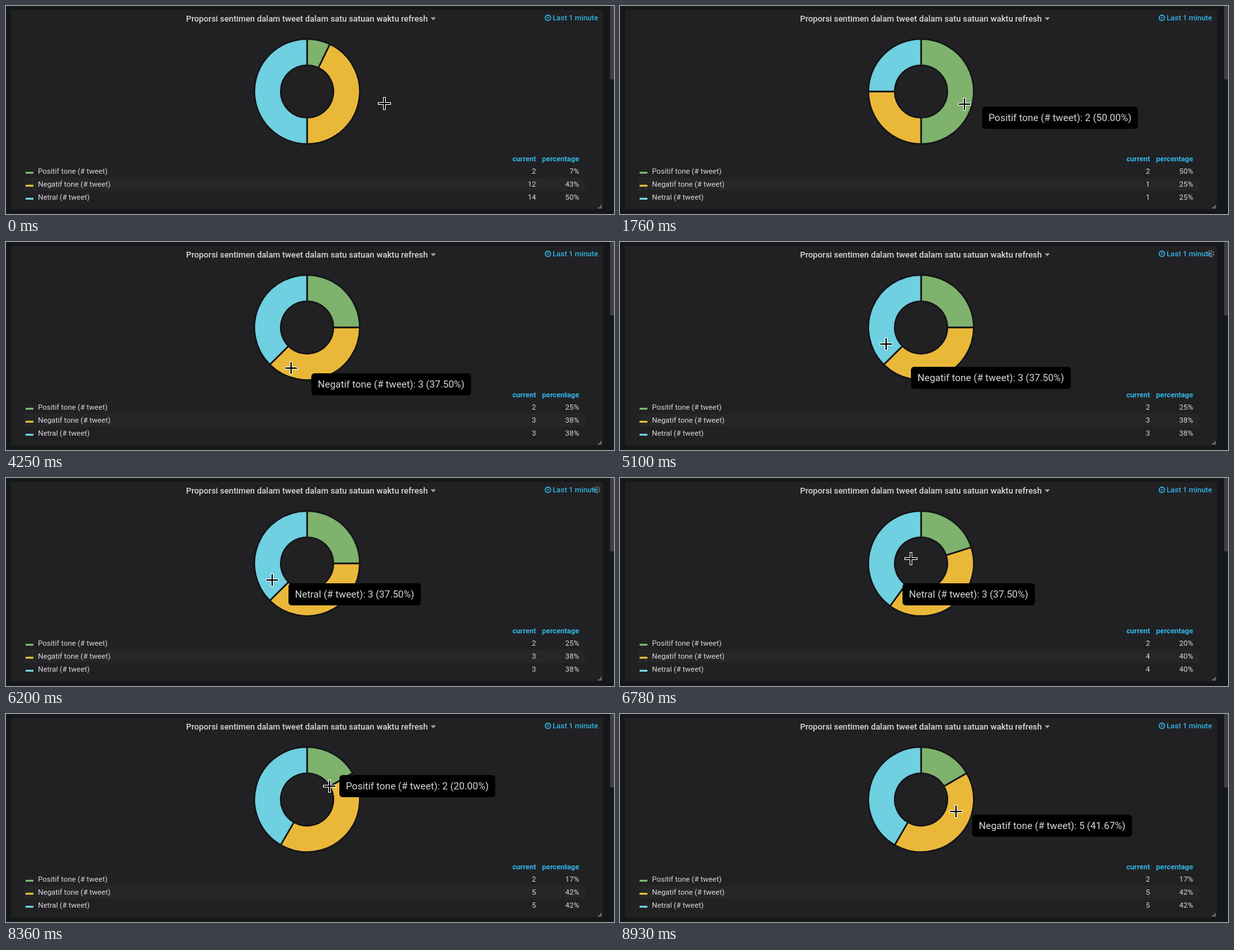
An HTML page that plays this animation: 932x320 px, repeating every 9720 ms.

```html
<!DOCTYPE html>
<html lang="id">
<head>
<meta charset="utf-8">
<title>Proporsi sentimen</title>
<style>
  html, body { margin: 0; width: 100%; height: 100%; overflow: hidden; background: #161719; }
  body { position: relative; font-family: Roboto, sans-serif; }
  svg { position: absolute; left: 0; top: 0; display: block; }
  text { fill: #d8d9da; font-size: 11.4px; }
  .title { font-size: 12.85px; font-weight: 500; }
  .accent { fill: #33b5e5; font-weight: 500; }
  .head { font-size: 11.2px; font-weight: 700; }
  .end { text-anchor: end; }
  #tip {
    position: absolute; height: 34px; padding: 0 10px; border-radius: 5px;
    background: #000; color: #d8d9da; font-size: 15px; line-height: 34px; white-space: nowrap;
  }
</style>
</head>
<body>
<svg width="932" height="320" viewBox="0 0 932 320">
  <rect x="8" y="6" width="907" height="307" fill="#212124"/>
  <rect x="926" y="-6" width="8" height="119" rx="2" fill="#404043"/>
  <text class="title" x="276" y="24">Proporsi sentimen dalam tweet dalam satu satuan waktu refresh</text>
  <path d="M651 17.5h8l-4 4.5z" fill="#a5a5a3"/>
  <g fill="none" stroke="#33b5e5">
    <circle cx="830.7" cy="18.2" r="4.1" stroke-width="1.6"/>
    <path d="M831 15.8v2.9h-2.2" stroke-width="1.1"/>
  </g>
  <text class="accent end" x="907.5" y="22">Last 1 minute</text>
  <path d="M912 306.5v4h-4.5" fill="none" stroke="#77777a" stroke-width="2"/>
  <g id="pie" stroke="#141416" stroke-width="2.4" stroke-linejoin="round"></g>
  <text class="accent head end" x="812.5" y="239">current</text>
  <text class="accent head end" x="878.5" y="239">percentage</text>
  <rect x="28" y="264" width="860" height="20" fill="#262628"/>
  <g id="legend"></g>
  <g id="spinner" fill="#8a8a8c"></g>
</svg>
<div id="tip"></div>
<svg width="932" height="320" viewBox="0 0 932 320">
  <g id="cursor">
    <path d="M0-10V10M-10 0H10" stroke="#fff" stroke-width="4"/>
    <path d="M0-9V9M-9 0H9" stroke="#000" stroke-width="2"/>
  </g>
</svg>
<script>
const LOOP = 9720;
const PIE = { x: 461.5, y: 131.5, r: 80.8, hole: 40.4 };
const TONES = [
  { name: 'Positif tone (# tweet)', color: '#7eb26d' },
  { name: 'Negatif tone (# tweet)', color: '#eab839' },
  { name: 'Netral (# tweet)', color: '#6ed0e0' }
];

const REFRESHES = [
  { at: 0, counts: [2, 12, 14], quiet: true },
  { at: 520, counts: [2, 1, 1] },
  { at: 2510, counts: [2, 3, 3] },
  { at: 5140, counts: [2, 3, 3] },
  { at: 6280, counts: [2, 4, 4] },
  { at: 8160, counts: [2, 5, 5], quiet: true }
];

// The pointer reaches x, y at `at` after moving for `move`; the tooltip follows `lag` later.
const STOPS = [
  { x: 580, y: 150, at: 0, move: 0 },
  { x: 530, y: 150, at: 560, move: 200, lag: 650 },
  { x: 443, y: 205, at: 2160, move: 440, lag: 270 },
  { x: 443, y: 197, at: 2730, move: 340, lag: 510 },
  { x: 421, y: 187, at: 4560, move: 480, lag: 220 },
  { x: 408, y: 157, at: 5020, move: 460, lag: 120 },
  { x: 486, y: 89, at: 7180, move: 780, lag: 100 },
  { x: 515, y: 150, at: 8650, move: 490, lag: 280 }
];

const $ = id => document.getElementById(id);
const sum = list => list.reduce((a, b) => a + b, 0);
const ease = k => (1 - Math.cos(Math.PI * k)) / 2;
const countsAt = t => REFRESHES.findLast(r => r.at <= t).counts;

function polar(r, turn) {
  const a = turn * 2 * Math.PI;
  return `${PIE.x + r * Math.sin(a)} ${PIE.y - r * Math.cos(a)}`;
}

function slice(from, to, color) {
  const { r, hole } = PIE, big = to - from > 0.5 ? 1 : 0;
  return `<path fill="${color}" d="M${polar(r, from)}A${r} ${r} 0 ${big} 1 ${polar(r, to)}` +
    `L${polar(hole, to)}A${hole} ${hole} 0 ${big} 0 ${polar(hole, from)}Z"/>`;
}

function drawData(counts) {
  const total = sum(counts);
  let pie = '', legend = '', turn = 0;
  TONES.forEach(({ name, color }, i) => {
    const share = counts[i] / total, y = 258 + 20 * i;
    pie += slice(turn, turn += share, color);
    legend += `<rect x="30" y="${y - 3}" width="12" height="3" rx="0.5" fill="${color}"/>
      <text x="49" y="${y}">${name}</text>
      <text class="end" x="812.5" y="${y}">${counts[i]}</text>
      <text class="end" x="878.5" y="${y}">${Math.round(share * 100)}%</text>`;
  });
  $('pie').innerHTML = pie;
  $('legend').innerHTML = legend;
}

// Index of the slice under a point, by its clockwise angle from the top.
function toneUnder(x, y, counts) {
  const turn = (Math.atan2(x - PIE.x, PIE.y - y) / (2 * Math.PI) + 1) % 1;
  return counts.findIndex((_, i) => turn < sum(counts.slice(0, i + 1)) / sum(counts));
}

function drawTip(stop) {
  const tip = $('tip');
  tip.hidden = !stop;
  if (!stop) return;
  const counts = countsAt(stop.at + stop.lag);
  const i = toneUnder(stop.x, stop.y, counts);
  const percent = (100 * counts[i] / sum(counts)).toFixed(2);
  tip.textContent = `${TONES[i].name}: ${counts[i]} (${percent}%)`;
  tip.style.left = stop.x + 25 + 'px';
  tip.style.top = stop.y + 5 + 'px';
}

function cursorAt(t) {
  const i = STOPS.findLastIndex(s => s.at - s.move <= t);
  const to = STOPS[i], from = STOPS[i - 1] || to;
  const k = t >= to.at ? 1 : ease(1 - (to.at - t) / to.move);
  return ['x', 'y'].map(axis => Math.round(from[axis] + (to[axis] - from[axis]) * k));
}

for (let i = 0; i < 8; i++) {
  $('spinner').innerHTML += `<circle cy="-4.5" r="1.1" transform="rotate(${i * 45})"/>`;
}

let counts, hovered = null;
const start = performance.now();

function frame() {
  const t = (performance.now() - start) % LOOP;
  const nextCounts = countsAt(t);
  const nextHovered = STOPS.findLast(s => s.at + s.lag <= t);
  if (nextCounts !== counts) drawData(counts = nextCounts);
  if (nextHovered !== hovered) drawTip(hovered = nextHovered);
  $('cursor').setAttribute('transform', `translate(${cursorAt(t)})`);
  const busy = REFRESHES.some(r => !r.quiet && t >= r.at - 120 && t < r.at + 40);
  $('spinner').setAttribute('visibility', busy ? 'visible' : 'hidden');
  $('spinner').setAttribute('transform', `translate(905.5 18) rotate(${t * 0.18})`);
  requestAnimationFrame(frame);
}
frame();
</script>
</body>
</html>
```
